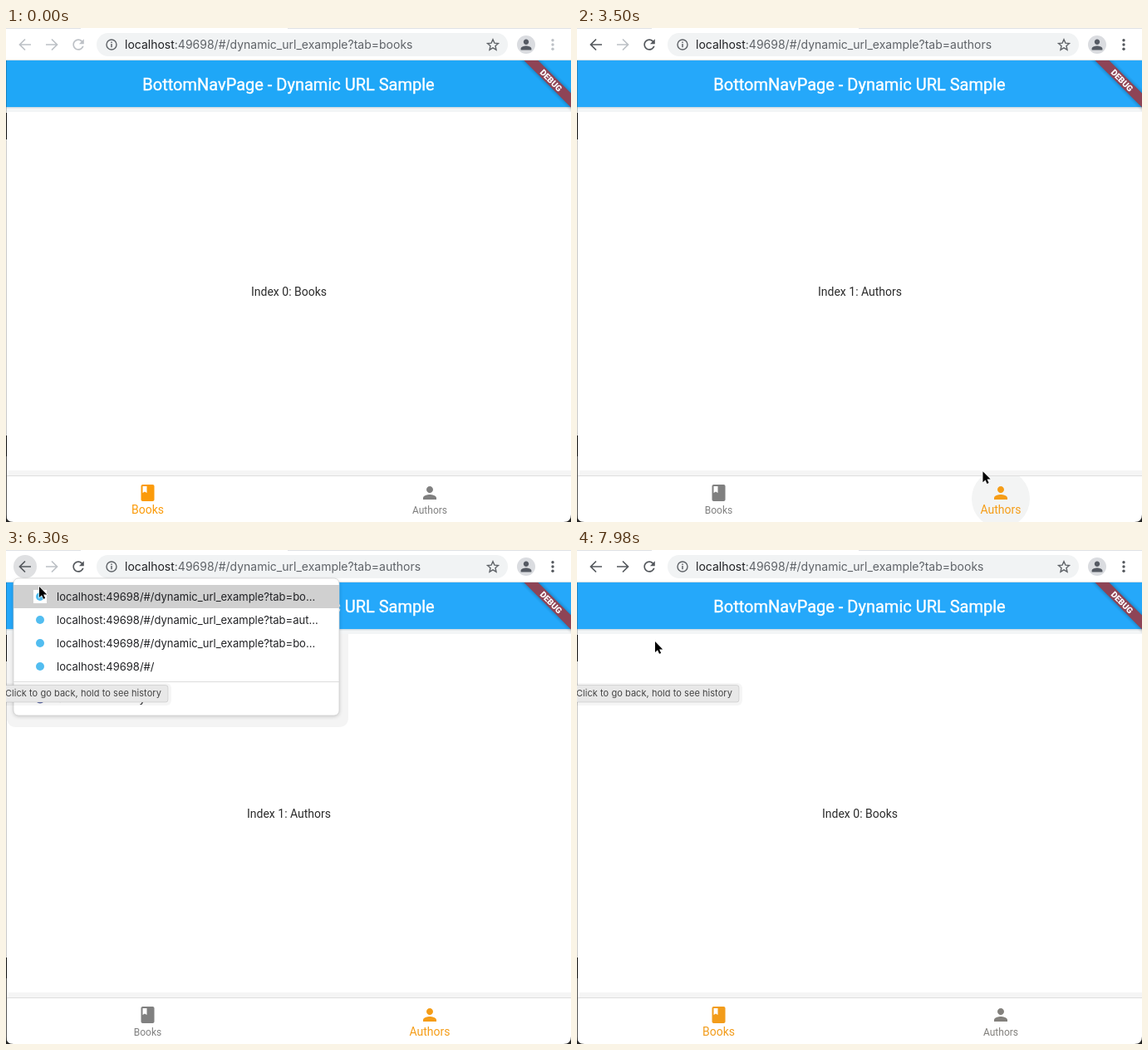
Write an HTML page that moves like this. It is 680x594 px and loops after 8000 ms.

```html
<!DOCTYPE html>
<html lang="en">
<head>
<meta charset="utf-8">
<title>Bottom navigation with dynamic URL</title>
<style>
html, body { margin: 0; width: 100%; height: 100%; overflow: hidden; background: #fff; }
svg { display: block; }
text { font-family: Roboto, sans-serif; white-space: pre; }
.ui text { font-family: Inter, sans-serif; }
.mid { text-anchor: middle; }
</style>
</head>
<body>
<svg width="680" height="594" viewBox="0 0 680 594">
  <defs>
    <filter id="blur" x="-30%" y="-30%" width="160%" height="160%"><feGaussianBlur stdDeviation="2.500"/></filter>
    <clipPath id="navClip"><rect y="539" width="680" height="55"/></clipPath>
    <clipPath id="pageClip"><rect y="39" width="680" height="555"/></clipPath>
    <path id="person" d="M12 12c2.21 0 4-1.79 4-4s-1.79-4-4-4-4 1.79-4 4 1.79 4 4 4zm0 2c-2.67 0-8 1.34-8 4v2h16v-2c0-2.66-5.33-4-8-4z"/>
    <path id="book" d="M18 2H6c-1.1 0-2 .9-2 2v16c0 1.1.9 2 2 2h12c1.1 0 2-.9 2-2V4c0-1.1-.9-2-2-2zM6 4h5v8l-2.5-1.500L6 12V4z"/>
    <path id="arrow" d="M7 0H-6M0-6.500L-6.500 0 0 6.500" fill="none" stroke-width="1.700"/>
  </defs>

  <rect width="680" height="594" fill="#fff"/>

  <!-- page -->
  <rect y="95" width="680" height="6" fill="#f3f5f6"/>
  <rect y="95" width="680" height="1.500" fill="#d3dde4"/>
  <rect id="bar" y="39" width="680" height="56"/>
  <text class="mid" x="340" y="75" font-size="20" fill="#fff" stroke="#fff" stroke-width=".4">BottomNavPage - Dynamic URL Sample</text>
  <g clip-path="url(#pageClip)">
    <g transform="translate(680 39) rotate(45)">
      <rect x="-60" y="28" width="120" height="12" fill="#000" opacity=".35" filter="url(#blur)"/>
      <rect x="-60" y="28" width="120" height="12" fill="#8e4456"/>
      <text class="mid" y="37.600" font-size="10.200" font-weight="900" fill="#fff">DEBUG</text>
    </g>
  </g>
  <text id="body" class="mid" x="340.500" y="322" font-size="14" fill="#2b2b2b"></text>

  <!-- bottom navigation -->
  <rect x="3" y="532" width="677" height="6" fill="#f5f5f5"/>
  <rect y="538" width="680" height="1" fill="#dedede"/>
  <g id="nav"></g>

  <!-- window edges -->
  <rect y="39" width="1" height="555" fill="#000" opacity=".21"/>
  <path d="M0 102h1v32H0zM0 490h1v25H0z" fill="#111"/>
  <path d="M0 515h1v79H0z" fill="#555"/>
  <path d="M0 585q0 9 9 9H0zM680 585q0 9-9 9h9z" fill="#222"/>

  <!-- browser toolbar -->
  <g class="ui">
    <path d="M0 0h90v1H0zM339 0h341v1H339z" fill="#dfe1e5"/>
    <rect y="38" width="680" height="1" fill="#dfe1e3"/>
    <rect x="109" y="6" width="495" height="28" rx="14" fill="#f1f3f4"/>
    <circle id="backHover" cx="23" cy="20" r="14" fill="#dfe0e2"/>
    <use id="back" href="#arrow" x="23" y="20"/>
    <use id="forward" href="#arrow" transform="translate(55 20) scale(-1 1)"/>
    <path id="reload" transform="translate(77 10) scale(.84)" d="M17.650 6.350C16.200 4.900 14.210 4 12 4c-4.420 0-7.990 3.580-7.990 8s3.570 8 7.990 8c3.730 0 6.840-2.550 7.730-6h-2.080c-.82 2.330-3.040 4-5.650 4-3.310 0-6-2.690-6-6s2.690-6 6-6c1.660 0 3.140.69 4.220 1.780L13 11h7V4l-2.350 2.350z"/>
    <circle cx="127" cy="20" r="6" fill="none" stroke="#5f6368" stroke-width="1.400"/>
    <path d="M127 16.500v1.500M127 19v4.300" stroke="#5f6368" stroke-width="1.500"/>
    <text x="143" y="25" font-size="14" fill="#5f6368"><tspan fill="#202124">localhost</tspan><tspan id="url"></tspan></text>
    <path d="M586 13.800l1.900 4.300 4.600.4-3.500 3.100 1 4.600-4-2.400-4 2.400 1-4.600-3.500-3.100 4.600-.4z" fill="none" stroke="#5f6368" stroke-width="1.400"/>
    <circle cx="626" cy="20" r="11" fill="#dadce0"/>
    <use href="#person" transform="translate(616.400 10.400) scale(.8)" fill="#555a63"/>
    <g id="dots"><circle cx="658" cy="14.800" r="1.700"/><circle cx="658" cy="20" r="1.700"/><circle cx="658" cy="25.200" r="1.700"/></g>
  </g>

  <!-- history menu -->
  <g id="menu" class="ui">
    <path d="M1 101H412V201q0 12-12 12H12q-9 0-11-9z" fill="#f4f4f4"/>
    <rect x="9" y="36" width="392" height="164" rx="6" fill="#000" opacity=".2" filter="url(#blur)"/>
    <rect x="9" y="34" width="392" height="165" rx="6" fill="#fff" stroke="#cdcdcd" stroke-width=".7"/>
    <rect id="rowHover" x="9" width="392" height="28" fill="#d0d0d0"/>
    <rect id="iconHover" x="33" width="16" height="16" fill="#fff"/>
    <g id="rows"></g>
    <rect x="9" y="158" width="392" height="1" fill="#dcdcdc"/>
    <circle cx="41" cy="178.500" r="6" fill="#5d6aa5"/>
    <text x="61" y="183" font-size="13" fill="#202124">Show Full History</text>
  </g>
  <g id="tip" class="ui">
    <rect x="-6" y="160" width="205" height="27" rx="6" opacity=".04"/>
    <rect x="-6" y="162.500" width="201" height="20.500" rx="3" fill="#e8e8e8" stroke="#000" stroke-opacity=".1"/>
    <text x="-1" y="176" font-size="11" letter-spacing=".05" fill="#444">Click to go back, hold to see history</text>
  </g>

  <g id="hand" fill="#fff" stroke="#111" stroke-width="1.200" stroke-linejoin="round">
    <path d="M-1 1c0-2 3-2 3 0v5c.5-1 2.500-.8 2.600.4c.8-.8 2.300-.4 2.400.8c.9-.5 2.200 0 2.200 1.200c0 3-.7 4-1.600 5.600v2.500H.5v-1.500c-1.500-1.800-2.800-3.200-4.300-5.500c-.8-1.300.9-2.400 2-1.400l.8.8z"/>
    <path d="M2.500 11v3M4.600 11v3M6.700 11v3" stroke-width=".8"/>
  </g>
  <path id="pointer" d="M0 0V13l3-2.800 2 4.600 2.200-.9-2.100-4.500h4.100z" stroke="#fff" stroke-width="1.200" paint-order="stroke"/>
</svg>
<script>
const LOOP = 8000;
const $ = id => document.getElementById(id);
const set = (el, attrs) => { for (const k in attrs) el.setAttribute(k, attrs[k]); };
const show = (id, on) => $(id).style.display = on ? '' : 'none';
const clamp = v => Math.max(0, Math.min(1, v));
const ease = v => (v = clamp(v), v * v * (3 - 2 * v));
const mix = (a, b, k) => a + (b - a) * k;
const between = (t, a, b) => t >= a && t < b;

const tabs = [
  { name: 'Books', x: 170.5, icon: 'book' },
  { name: 'Authors', x: 510, icon: 'person' }
];
const visits = [[-1000, 0], [1000, 1], [2150, 0], [3000, 1], [7800, 0]];   // time, tab
const hovers = [                                                        // tab, enter, click, leave
  [1, 420, 1000, 1890], [0, 1890, 2150, 2530], [1, 2530, 3000, 3560]
];
const path = [                                                          // time, x, y
  [350, 570, 600], [850, 497, 562], [1690, 497, 562], [2050, 175, 565],
  [2374, 175, 565], [2690, 510, 557], [3400, 510, 557], [4200, 18, 13],
  [6300, 18, 13], [6301, 40, 44], [7000, 95, 99], [7080, 95, 99], [7250, 94, 110]
];
const activeAt = 560, backHoverAt = 4150, tipAt = 4900;
const menuOpen = 5250, menuClose = 7500, moveAgain = 6300;

$('nav').innerHTML = tabs.map(({ name, x, icon }, i) => `
  <circle id="glow${i}" cx="${x}" cy="566" r="35" fill="#f3f4f4" clip-path="url(#navClip)"/>
  <g id="tab${i}"><use href="#${icon}" x="${x - 12}" y="547"/>
    <text id="label${i}" class="mid" x="${x}" y="584">${name}</text></g>
  <g id="hint${i}"><rect x="${x - (i ? 25 : 22)}" y="505" width="${i ? 51 : 44}" height="24" rx="4" fill="#616161" opacity=".9"/>
    <text class="mid" x="${x}" y="520.500" font-size="10" fill="#fff">${name}</text></g>`).join('');

const base = ':49698/#/';
$('rows').innerHTML = ['bo...', 'aut...', 'bo...', ''].map((end, i) => `
  <circle cx="41" cy="${56 + 28 * i}" r="5" fill="#52bdf0"/>
  <text x="61" y="${60.7 + 28 * i}" font-size="13" fill="#202124">localhost${base}${end && 'dynamic_url_example?tab=' + end}</text>`).join('');

function cursorAt(t) {
  const i = path.findIndex(p => p[0] > t);
  if (i < 0) return path[path.length - 1].slice(1);
  if (!i) return path[0].slice(1);
  const [a, b] = [path[i - 1], path[i]];
  const k = ease((t - a[0]) / (b[0] - a[0]));
  return [mix(a[1], b[1], k), mix(a[2], b[2], k)];
}

function drawTabs(t, tab, since) {
  const k = ease((t - since) / 200);
  tabs.forEach((_, i) => {
    const on = i === tab ? k : 1 - k;
    const orange = t < activeAt ? [251, 155, 10] : [245, 157, 24];
    const rgb = orange.map(c => Math.round(mix(128, c, on)));
    set($('tab' + i), { fill: `rgb(${rgb})` });
    set($('label' + i), { 'font-size': mix(12, 14, on) });
    let glow = 0, hint = 0;
    for (const [h, enter, click, leave] of hovers) if (h === i) {
      glow = Math.max(glow, clamp((t - enter) / 50) * clamp((leave + 50 - t) / 50));
      hint = Math.max(hint, clamp((t - enter) / 150) * clamp((click + 75 - t) / 75));
    }
    set($('glow' + i), { opacity: glow });
    set($('hint' + i), { opacity: hint });
  });
}

function draw(t) {
  const [since, tab] = visits.filter(v => v[0] <= t).pop();
  const name = tabs[tab].name;
  $('body').textContent = `Index ${tab}: ${name}`;
  $('url').textContent = `${base}dynamic_url_example?tab=${name.toLowerCase()}`;
  drawTabs(t, tab, since);

  const active = t >= activeAt, dim = '#bdc1c6', dark = '#54585d';
  set($('bar'), { fill: active ? '#25a8fa' : '#1fa7f7' });
  set($('back'), { stroke: t >= visits[1][0] ? dark : dim });
  set($('forward'), { stroke: t >= visits[4][0] ? dark : dim });
  set($('reload'), { fill: active ? dark : dim });
  set($('dots'), { fill: active ? dark : dim });

  const [x, y] = cursorAt(t);
  const row = Math.floor((y - 42) / 28);
  const rowOn = t > moveAgain && between(row, 0, 4);
  show('backHover', between(t, backHoverAt, menuClose));
  show('menu', between(t, menuOpen, menuClose));
  show('tip', t >= tipAt);
  show('rowHover', rowOn);
  show('iconHover', rowOn);
  set($('rowHover'), { y: 42 + 28 * row });
  set($('iconHover'), { y: 48 + 28 * row });

  const visible = t >= path[0][0] && !between(t, menuOpen, moveAgain);
  const onNav = y > 538;
  show('hand', visible && onNav);
  show('pointer', visible && !onNav);
  for (const id of ['hand', 'pointer']) set($(id), { transform: `translate(${x} ${y})` });
}

const start = performance.now();
function tick(now) {
  draw(Math.max(0, now - start) % LOOP);
  requestAnimationFrame(tick);
}
draw(0);
requestAnimationFrame(tick);
</script>
</body>
</html>
```
